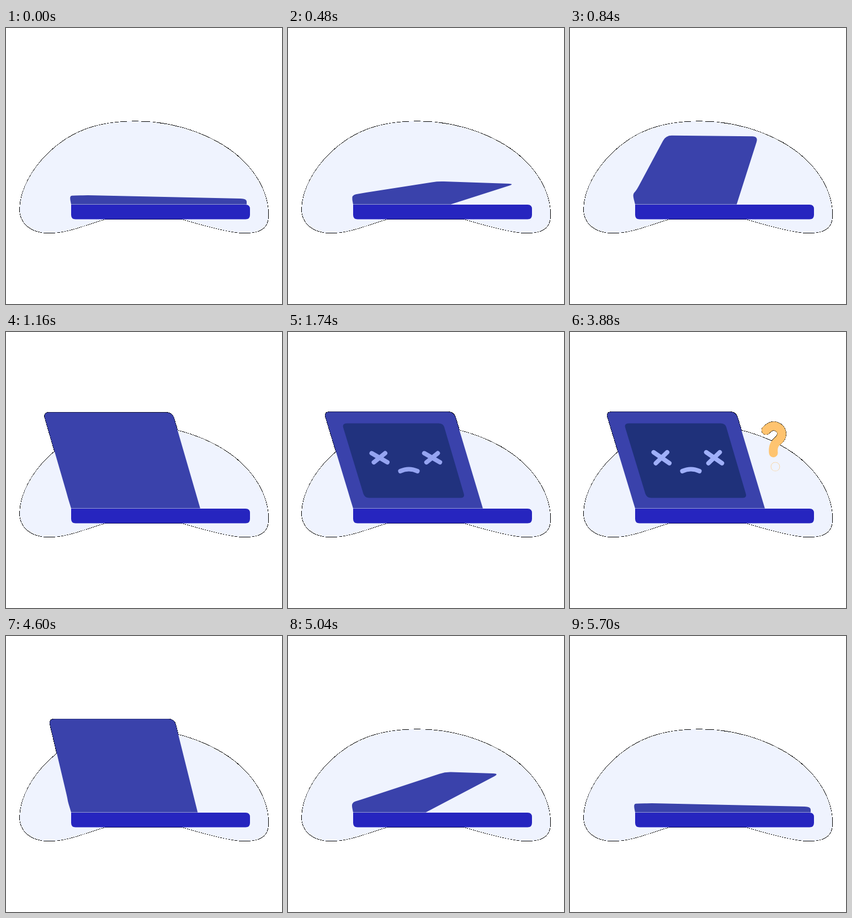
Recreate the animation shown at these times as an HTML page. Size 500 by 500 pixels, loop 6.02 s.

```html
<!DOCTYPE html>
<html lang="en">
<head>
<meta charset="utf-8">
<title>Laptop</title>
<style>
  html, body { margin: 0; width: 100%; height: 100%; overflow: hidden; background: #fff; }
  svg { display: block; width: 100vw; height: 100vh; }
  .line { fill: none; stroke-linecap: round; stroke-linejoin: round; }
  .outline { fill: none; stroke: #000; stroke-width: 1.2; }
  .crisp { shape-rendering: crispEdges; }
</style>
</head>
<body>
<svg viewBox="0 0 500 500">
  <defs>
    <path id="blob" d="M235 169C318 169 390 202 428 239S475.5 313 475.5 339S458 371.5 432 371.5S355 357 318 346H181C145 356 113 371.5 78 371.5S24.7 352 24.7 328C26 292 47 256 75 228C120 184 170 169 235 169Z"/>
    <path id="lid"/>
    <path id="base" d="M118 320H434q8 0 8 8v10.5q0 8-8 8H126q-8 0-8-8z"/>
    <path id="hook" d="M355 178C362 171 368 169 373 171C384 175 387 186 379 195C372 201 367 205 368.5 219"/>
    <circle id="dot" cx="372" cy="244" r=".3"/>
  </defs>
  <g class="outline crisp">
    <use href="#blob"/>
    <use href="#lid"/>
    <use href="#base"/>
  </g>
  <g id="questionEdge" class="line crisp" stroke="#000" stroke-width="17">
    <use href="#hook"/>
    <use href="#dot"/>
  </g>
  <use href="#blob" class="crisp" fill="#eff3fe"/>
  <use href="#lid" fill="#3a42ab"/>
  <use href="#base" fill="#2625bf"/>
  <g id="face">
    <path fill="#1f317a" d="M107 165.5H273Q281 165.5 283 172L318.5 293Q320.5 300.5 313 300.5H147Q139 300.5 136.5 293L100 173Q98 165.5 107 165.5Z"/>
    <g class="line" stroke="#a0b0fa" stroke-width="8">
      <path id="eyes"/>
      <path d="M203.5 252Q219 245 234.5 252"/>
    </g>
  </g>
  <g id="question" class="line" stroke="#ffc470" stroke-width="16">
    <use href="#hook"/>
    <use href="#dot"/>
  </g>
</svg>
<script>
const LOOP = 6020;
const $ = id => document.getElementById(id);

// Lid corners from the hinge round to the foot: rear, shoulder, top left, top right, foot.
const HINGE = [118, 319.6];
const CLOSED = [[115, 304], [124, 303.4], [150, 303], [436, 309.3], [436, 319.6]];
const HALF = [[115, 302.4], [134, 298], [327.6, 266], [399, 269.8], [229.5, 319.6]];
const OPEN = [[112, 300], [110, 293], [65, 144.5], [300.5, 144.5], [353, 319.6]];

const ramp = (t, start, length) => Math.min(1, Math.max(0, (t - start) / length));
const smooth = x => x * x * (3 - 2 * x);
const accelerate = x => x ** 1.72;
const mix = (a, b, k) => a.map((v, i) => v + (b[i] - v) * k);
const mixPose = (a, b, k) => a.map((p, i) => mix(p, b[i], k));

// Moves from a corner towards its neighbour, at most half the edge.
function along(from, to, distance) {
  const length = Math.hypot(to[0] - from[0], to[1] - from[1]);
  return mix(from, to, Math.min(.5, distance / length));
}

function roundedPath(points, radius) {
  const corners = points.slice(1, -1).map((p, i) =>
    `L${along(p, points[i], radius)}Q${p} ${along(p, points[i + 2], radius)}`);
  return `M${points[0]}${corners.join('')}L${points.at(-1)}Z`;
}

function lidPath(x) {
  const pose = x < .5
    ? mixPose(CLOSED, HALF, accelerate(2 * x))
    : mixPose(OPEN, HALF, accelerate(2 - 2 * x));
  return roundedPath([HINGE, ...pose], 11);
}

function eyePath(x, height) {
  const top = 228 - 10.5 * height, bottom = 228 + 10 * height;
  return `M${x - 14.5} ${top}L${x + 14} ${bottom}M${x + 10} ${top}L${x - 10.5} ${bottom}`;
}

function draw(t) {
  const lid = ramp(t, 0, 1200) - ramp(t, 4500, 1200);
  const leave = ramp(t, 3860, 600);
  const face = ramp(t, 1420, 400) - leave;
  const question = smooth(ramp(t, 1940, 600) - leave);

  $('lid').setAttribute('d', lidPath(lid));
  $('eyes').setAttribute('d', eyePath(166, face) + eyePath(261.3, face));
  $('face').style.opacity = smooth(face);
  $('question').style.opacity = $('questionEdge').style.opacity = question;
}

function tick() {
  draw(performance.now() % LOOP);
  requestAnimationFrame(tick);
}
tick();
</script>
</body>
</html>
```
